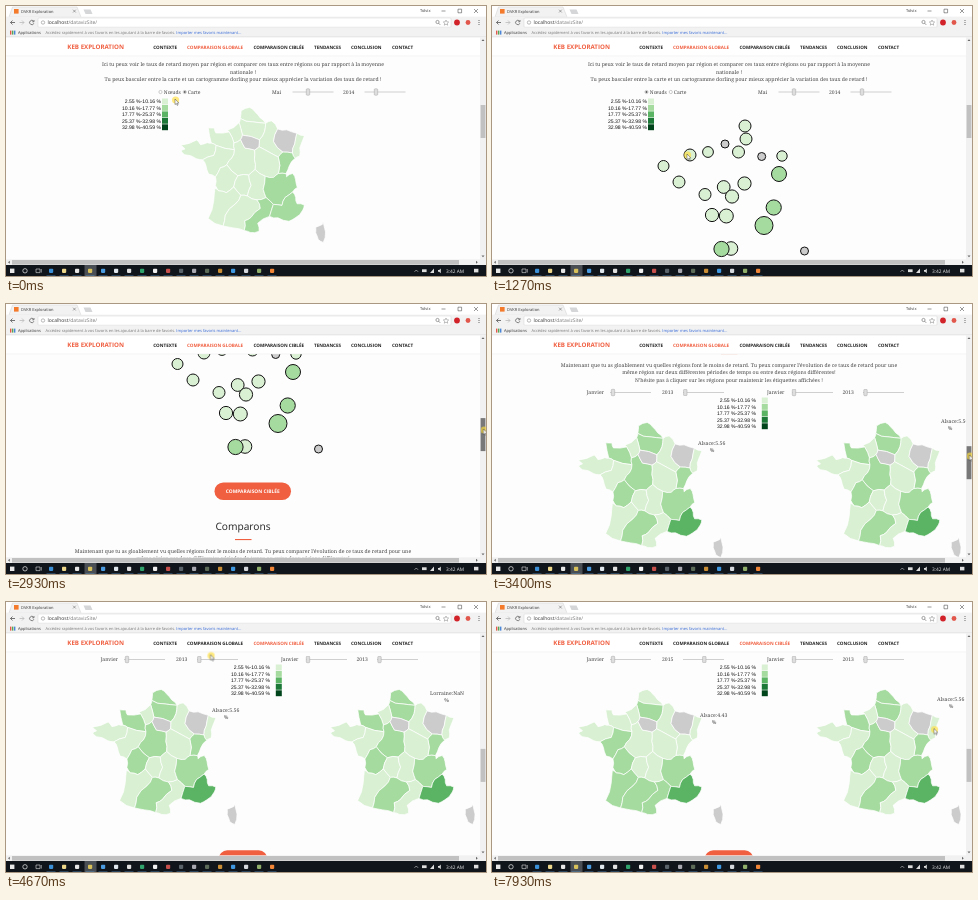
An HTML page that plays this animation: 480 by 270 pixels, repeating every 8000 ms.

```html
<!DOCTYPE html>
<html lang="fr">
<head>
<meta charset="utf-8">
<title>Exploration</title>
<style>
html, body { margin: 0; width: 100%; height: 100%; overflow: hidden; background: #fff; }
svg { display: block; width: 100vw; height: 100vh; text-rendering: geometricPrecision; }
text { font-family: "Noto Serif", serif; font-size: 5.04px; fill: #444; white-space: pre; }
.mid { text-anchor: middle; font-size: 5.15px; }
.end { text-anchor: end; }
.ui { font-family: "Open Sans", sans-serif; font-size: 4px; fill: #333; }
.nav { font-family: "Open Sans", sans-serif; font-size: 4.58px; font-weight: 700; fill: #222; }
.on { fill: #f05f40; }
.brand { font-size: 6.2px; }
.key { font-family: "Liberation Sans", Arial, sans-serif; font-size: 5.1px; fill: #111; }
.tip { font-size: 5.2px; }
.btn { font-size: 4.9px; fill: #fff; }
.head { font-family: "Open Sans", sans-serif; font-size: 10.2px; fill: #222; }
.region { stroke: #fff; stroke-width: .7; stroke-linejoin: round; }
.node { stroke: #111; stroke-width: 1; }

#page, #thumb, #cursor, #map0, .node, .knob { animation: 8s linear infinite; }
#page { animation-name: scroll; }
#thumb { animation-name: thumb; }
#cursor { animation-name: cursor; animation-timing-function: ease-in-out; }
#map0 { animation-name: leave; }
.node { animation-name: settle; animation-timing-function: ease-out; }
.knob { animation-name: knob; }

@keyframes scroll {
  0%, 28.75% { transform: translateY(0); }
  32.5% { transform: translateY(-25px); }
  36.6%, 37.4% { transform: translateY(-100px); }
  42.4%, 43.4% { transform: translateY(-286px); }
  46.5%, 100% { transform: translateY(-317px); }
}
@keyframes thumb {
  0%, 28.75% { transform: translateY(0); fill: #c1c1c1; }
  28.8% { fill: #787878; }
  32.5% { transform: translateY(3.8px); }
  36.6%, 37.4% { transform: translateY(15.1px); }
  42.4%, 43.4% { transform: translateY(43.2px); }
  46.5% { transform: translateY(47.9px); }
  49% { fill: #787878; }
  49.1%, 100% { transform: translateY(47.9px); fill: #c1c1c1; }
}
@keyframes cursor {
  0%, .9% { transform: translate(169px, 93px); }
  3.7%, 6.2% { transform: translate(155px, 86px); }
  11%, 22.5% { transform: translate(195px, 148px); }
  28%, 28.75% { transform: translate(477.5px, 111px); }
  36.6%, 37.4% { transform: translate(477.5px, 125px); }
  42.4%, 43.4% { transform: translate(477.5px, 151px); }
  46.5%, 49% { transform: translate(477.5px, 157px); }
  54%, 55% { transform: translate(422px, 122px); }
  58.3%, 59.2% { transform: translate(204.5px, 52.6px); }
  60.9%, 68.3% { transform: translate(204px, 56px); }
  70.2% { transform: translate(212px, 57px); }
  71.6%, 75.9% { transform: translate(207.5px, 70px); }
  79.4% { transform: translate(203px, 122px); }
  83.4%, 86.6% { transform: translate(205px, 143px); }
  89.1%, 90.8% { transform: translate(428px, 136px); }
  95%, 100% { transform: translate(442px, 126.5px); }
}
@keyframes leave {
  0%, 5.6% { opacity: 1; }
  8.5%, 100% { opacity: 0; }
}
@keyframes settle {
  0%, 5.6% { opacity: 0; transform: translate(var(--dx), var(--dy)); }
  7% { opacity: 1; }
  14.5%, 100% { opacity: 1; transform: none; }
}
@keyframes knob {
  0%, 68.3% { transform: translateX(0); }
  70.2%, 100% { transform: translateX(19px); }
}
</style>
</head>
<body>
<svg viewBox="0 0 480 270" preserveAspectRatio="none">
  <rect width="480" height="270" fill="#fdfdfd"/>
  <g id="page"></g>
  <g id="chrome"></g>
  <g id="cursor">
    <circle cx=".6" cy="1" r="3.6" fill="#ffdf3d" opacity=".65"/>
    <path d="M0 0v5.6l1.3-1.2.9 2 .9-.4-.9-1.9h1.7z" fill="#fff" stroke="#222" stroke-width=".4"/>
  </g>
</svg>
<script>
const LOOP = 8000;
const SHADES = ['#d9f0d3', '#a6dba0', '#5bb463', '#1b7837', '#00441b'];
const GREY = '#ccc';
const END = 317; // final scroll offset
const $ = id => document.getElementById(id);

// Lambert conformal conic, cone constant N
const N = .5263, SCALE = 913.6, RAD = Math.PI / 180;
function cone(lon, lat) {
  const rho = SCALE / N * Math.tan((45 - lat / 2) * RAD) ** N, a = lon * N * RAD;
  return [rho * Math.sin(a), rho * Math.cos(a)];
}
const mid = cone(2.454, 46.279);
const project = ([lon, lat]) => cone(lon, lat).map((v, i) => v - mid[i]);

// outer border, anticlockwise from the northern tip
const outer = [
  [2.54, 51.09], [1.6, 50.87], [1.5, 50.35], [1.37, 50.07], [.1, 49.55], [.3, 49.43],
  [-1.1, 49.36], [-1.26, 49.69], [-1.92, 49.7], [-1.57, 48.65], [-2, 48.68], [-2.7, 48.53],
  [-3.1, 48.85], [-4.75, 48.45], [-4.3, 48.2], [-4.7, 48.04], [-4.3, 47.8], [-3.1, 47.55],
  [-2.45, 47.48], [-2.1, 47.1], [-1.8, 46.49], [-1.1, 46.3], [-1.1, 45.7], [-.75, 45.32],
  [-1.15, 45.5], [-1.25, 44.6], [-1.78, 43.36], [-.31, 42.84], [.67, 42.7], [1.73, 42.5],
  [2.3, 42.36], [3.17, 42.43], [3.05, 43], [4.23, 43.46], [5.05, 43.33], [6.1, 43.05],
  [6.7, 43.25], [7.52, 43.79], [7.7, 44.13], [7, 44.25], [6.9, 44.7], [6.63, 45.1],
  [7.12, 45.4], [7, 45.95], [6.75, 46.4], [6.1, 46.2], [6.06, 46.42], [6.45, 46.95],
  [7.1, 47.45], [7.58, 47.58], [7.65, 48.15], [8.23, 48.97], [7.45, 49.17], [6.4, 49.45],
  [5.45, 49.55], [4.85, 50.12], [4.2, 49.97], [3.65, 50.35], [3.1, 50.78]
].map(project);

// junctions inside the country
const inner = {
  a: [1.7, 49.2], b: [1.5, 48.9], c: [.8, 48.67], d: [.85, 48.2], e: [-1.07, 48.5],
  f: [3.48, 48.85], g: [3.42, 48.37], h: [2.95, 48.15], i: [5.88, 47.93], j: [5.37, 47.6],
  k: [6.85, 47.83], l: [.05, 47.15], m: [1.17, 46.38], n: [2.28, 46.42], o: [2.95, 46.8],
  p: [3.95, 46.3], q: [5.3, 46.45], r: [.75, 45.6], s: [1.45, 45], t: [2.1, 44.95],
  u: [3.05, 44.65], v: [3.95, 44.8], w: [4.65, 44.3], x: [3.35, 44.05], y: [2.4, 43.42],
  z: [1.8, 43.2], A: [.9, 44.4], B: [-.1, 43.6], C: [5.5, 44.2], D: [5.85, 44.75],
  E: [-1.3, 47.8], F: [.6, 47.65], G: [4.95, 48.7], H: [7.15, 48.45], I: [4.8, 46.2],
  J: [3.7, 45.4], K: [4.05, 49.4], L: [1.95, 48.3], M: [-.6, 46.95], N: [2.9, 47.5],
  O: [4.5, 47.95], P: [2.8, 50.1], R: [0, 45.2], S: [2.5, 45.7]
};
for (const k in inner) inner[k] = project(inner[k]);

const island = [[9.4, 43], [9.45, 42.6], [9.55, 42.1], [9.25, 41.37], [8.8, 41.6],
  [8.6, 42.1], [8.65, 42.5], [9.3, 42.65]].map(project);

// name: [ring, circle x, y, radius]
const regions = {
  nord: ['0-2 P 56-58', 253, 120, 6],
  picardie: ['2-3 a f K 56 P', 254, 133, 6],
  hauteNormandie: ['3-5 c b a', 216, 146, 5.4],
  basseNormandie: ['5-9 e d c', 198, 149, 6],
  bretagne: ['9-18 E e', 171.5, 160, 5.5],
  loire: ['18-21 M l F d e E', 187, 176, 6],
  centre: ['c d F l m n o N h L b', 213, 188.5, 6],
  ile: ['a b L h g f', 233, 138, 4],
  champagne: ['56 K f g O j i G 54-55', 246.5, 146, 6],
  lorraine: ['54 G i k H 52-53', 269.7, 150.5, 4],
  alsace: ['52 H k 48-51', 290, 150, 5.2],
  comte: ['i j q 46-48 k', 287, 168, 7.5],
  bourgogne: ['h N o p I q j O g', 252.5, 177.5, 6.6],
  poitou: ['21-23 R r m l M', 220, 209, 6.6],
  limousin: ['m r s t S n', 231.7, 181, 6.4],
  auvergne: ['n S t u v J p o', 240, 190.5, 6.6],
  rhone: ['p J v w C D 41-46 q I', 281.7, 201.5, 7.6],
  aquitaine: ['23-27 B A s r R', 234.3, 210, 7],
  midi: ['27-29 z y x u t s A B', 239, 242.5, 6.8],
  languedoc: ['29-33 w v u x y z', 229.5, 243, 7.6],
  paca: ['33-41 D C w', 272, 219.5, 9],
  corse: [null, 312.5, 245, 4]
};

function ring(spec) {
  if (!spec) return island;
  return spec.split(' ').flatMap(s => {
    if (inner[s]) return [inner[s]];
    const [a, b = a] = s.split('-').map(Number);
    return outer.slice(a, b + 1);
  });
}

// bend every edge a little, equally for both neighbours
function bend(p, q) {
  const [a, b] = p[0] < q[0] ? [p, q] : [q, p];
  const k = .09 * Math.sin(a[0] * 7 + b[1] * 5);
  return [(a[0] + b[0]) / 2 + k * (b[1] - a[1]), (a[1] + b[1]) / 2 - k * (b[0] - a[0])];
}
const fix = p => p.map(v => v.toFixed(2)).join(' ');
const outline = pts => 'M' + pts.map((p, i) => {
  const q = pts[(i + 1) % pts.length];
  return fix(p) + 'L' + fix(bend(p, q));
}).join('L') + 'Z';

function shade(name, medium, strong) {
  if (['ile', 'lorraine', 'corse'].includes(name)) return GREY;
  return SHADES[name === strong ? 2 : medium.split(' ').includes(name) ? 1 : 0];
}
function map(x, y, medium, strong, attrs = '') {
  const paths = Object.entries(regions).map(([name, [spec]]) =>
    `<path class="region" fill="${shade(name, medium, strong)}" d="${outline(ring(spec))}"/>`);
  return `<g ${attrs}><g transform="translate(${x} ${y})">${paths.join('')}</g></g>`;
}
function nodes(x, y, medium) {
  return Object.entries(regions).map(([name, [spec, cx, cy, r]]) => {
    const pts = ring(spec);
    const avg = i => pts.reduce((s, p) => s + p[i], 0) / pts.length;
    const dx = (x + avg(0) - cx).toFixed(1), dy = (y + avg(1) - cy).toFixed(1);
    return `<circle class="node" style="--dx:${dx}px;--dy:${dy}px" cx="${cx}" cy="${cy}" r="${r}" fill="${shade(name, medium)}"/>`;
  }).join('');
}

const text = (x, y, s, cls = '', attrs = '') => `<text x="${x}" y="${y}" class="${cls}" ${attrs}>${s}</text>`;
const rect = (x, y, w, h, fill, attrs = '') => `<rect x="${x}" y="${y}" width="${w}" height="${h}" fill="${fill}" ${attrs}/>`;
const dot = (x, y, r, fill, attrs = '') => `<circle cx="${x}" cy="${y}" r="${r}" fill="${fill}" ${attrs}/>`;
const line = (d, color, w = .6) => `<path d="${d}" fill="none" stroke="${color}" stroke-width="${w}"/>`;
const span = (a, b) => `data-span="${a} ${b}"`;

const slider = (x, y, at, cls = '') =>
  rect(x, y - .5, 41, 1, '#cfcfcf') +
  rect(at - 1.7, y - 3.2, 3.4, 6.4, '#dedede', `class="${cls}" rx=".8" stroke="#a4a4a4" stroke-width=".5"`);

function legend(right, box, y) {
  const stops = ['2.55', '10.16', '17.77', '25.37', '32.98', '40.59'];
  return SHADES.map((c, i) =>
    text(right, y + i * 6.45 + 1.8, `${stops[i]} %-${stops[i + 1]} %`, 'key end') +
    rect(box, y + i * 6.45 - 3, 6, 5.9, c)).join('');
}
const radio = (x, y, a, b) => dot(x, y, 1.6, '#fff', 'stroke="#999" stroke-width=".5"') +
  dot(x, y, .9, '#555', span(a, b));
const button = (x, y, w, label = '') => rect(x, y, w, 17.6, '#f05f40', 'rx="8.8"') +
  text(x + w / 2, y + 10.6, label, 'nav btn mid');
const tip = (x, y, s, half, a, b) => `<g ${span(a, b)}>` + text(x, y + 1.8, s, 'tip') +
  text(x + half, y + 9.2, '%', 'tip mid') + '</g>';

const JAN13 = 'nord picardie basseNormandie centre poitou midi comte rhone';
const JAN15 = 'picardie loire poitou aquitaine midi languedoc rhone';
const MAY14 = 'comte rhone languedoc paca';
const row = END + 57.5;

$('page').innerHTML = [
  text(237, 60.2, 'Ici tu peux voir le taux de retard moyen par région et comparer ces taux entre régions ou par rapport à la moyenne', 'mid'),
  text(237, 67.8, 'nationale !', 'mid'),
  text(237, 74.9, 'Tu peux basculer entre la carte et un cartogramme dorling pour mieux apprécier la variation des taux de retard !', 'mid'),
  radio(154.5, 86, 480, LOOP), text(157.8, 87.8, 'Nœuds'),
  radio(178.8, 86, 0, 480), text(181.8, 87.8, 'Carte'),
  text(266, 87.8, 'Mai'), slider(286.5, 86, 302),
  text(337, 87.8, '2014'), slider(358.5, 86, 370),
  legend(155, 156, 95.5),
  map(244.5, 171, MAY14, '', 'id="map0"'),
  nodes(244.5, 171, MAY14),
  button(208.5, 278.5, 76.5, 'COMPARAISON CIBLÉE'),
  text(237, 326.3, 'Comparons', 'head mid'),
  rect(229, 335, 16.5, 1.1, '#f05f40'),
  text(237, 349.2, 'Maintenant que tu as gloablement vu quelles régions font le moins de retard. Tu peux comparer l’évolution de ce taux de retard pour une', 'mid'),
  text(237, 356.3, 'même région sur deux différentes périodes de temps ou entre deux régions différentes!', 'mid'),
  text(237, 363.6, 'N’hésite pas à cliquer sur les régions pour maintenir les étiquettes affichées !', 'mid'),
  text(94.5, row + 1.8, 'Janvier'), slider(118, row, 121),
  text(170, row + 1.8, '2013', '', span(0, 5600)),
  text(170, row + 1.8, '2015', '', span(5600, LOOP)),
  slider(191, row, 193.3, 'knob'),
  text(275, row + 1.8, 'Janvier'), slider(300, row, 302),
  text(350.5, row + 1.8, '2013'), slider(371, row, 373.5),
  legend(264, 269.8, END + 65.5),
  map(156, END + 157, JAN13, 'paca', span(0, 5600)),
  map(156, END + 157, JAN15, 'paca', span(5600, LOOP)),
  map(394, END + 157, JAN13, 'paca'),
  tip(206, END + 108, 'Alsace:5.56', 14, 0, 6330),
  tip(208, END + 113, 'Alsace:4.43', 14, 6330, LOOP),
  tip(449, END + 86, 'Alsace:5.56', 9, 0, 4200),
  tip(424, END + 91, 'Lorraine:NaN', 16.5, 4200, 7400),
  tip(445, END + 97, 'Alsace:5.56', 14, 7400, LOOP),
  button(212.5, 565.3, 49)
].join('');

// label, then the time it is highlighted
const menu = [[147.3, 'CONTEXTE'], [181, 'COMPARAISON GLOBALE', 0, 3530], [247.5, 'COMPARAISON CIBLÉE', 3530, LOOP],
  [308, 'TENDANCES'], [345, 'CONCLUSION'], [386, 'CONTACT']];
const item = ([x, s, a, b]) => b
  ? text(x, 42.7, s, 'nav on', span(a, b)) + text(x, 42.7, s, 'nav', a ? span(0, a) : span(b, LOOP))
  : text(x, 42.7, s, 'nav');
const apps = ['#3b8fd6', '#ecd68a', '#e6e6e6', '#d8c05a', '#4a9be0', '#dfe6ec', '#e0e0e0', '#2fa36b', '#f0f0f0',
  '#c8504c', '#5a626a', '#a8a8b0', '#5c6a58', '#c98d35', '#3f98e0', '#d4d8dc', '#8fae6a', '#f08537'];

$('chrome').innerHTML = [
  // tab strip
  rect(0, 0, 480, 11, '#fff'),
  '<path d="M3 11L6.5 1H71l4 10z" fill="#f2f2f2" stroke="#c4c4c4" stroke-width=".4"/>',
  rect(8, 3, 4.6, 4.6, '#f47a2c'),
  text(15, 6.8, 'DVKR Exploration', 'ui'),
  line('M67 3.7l2.8 2.8m0-2.8l-2.8 2.8', '#555', .5),
  '<path d="M77.5 3.5h7l2 4.5h-7z" fill="#d4d6d8"/>',
  text(414, 6.3, 'Tolvix', 'ui'),
  line('M435.5 5h4M452 3.2h3.6v3.6H452zM468 3l4 4m0-4l-4 4', '#333', .5),
  // address and bookmark bars
  rect(0, 10.6, 480, 20.4, '#f2f2f2'),
  rect(32, 12, 413, 9.2, '#fff', 'rx="1" stroke="#ccc" stroke-width=".4"'),
  line('M9 16.5H4.5m2-2l-2 2 2 2', '#555', .8),
  line('M13.5 16.5H18m-2-2l2 2-2 2', '#bbb', .8),
  line('M27.6 15.2a2.2 2.2 0 1 0 .3 2M28 14v1.8h-1.8', '#555', .7),
  dot(37, 16.5, 1.7, 'none', 'stroke="#777" stroke-width=".5"'),
  text(41.5, 18.3, 'localhost<tspan fill="#777">/datavizSite/</tspan>', 'ui', 'style="font-size:5px"'),
  dot(431.5, 16, 1.6, 'none', 'stroke="#666" stroke-width=".6"'),
  line('M432.6 17.2l1.6 1.6', '#666', .7),
  '<path d="M440 14l.8 1.8 1.9.2-1.4 1.3.4 1.9-1.7-1-1.7 1 .4-1.9-1.4-1.3 1.9-.2z" fill="none" stroke="#666" stroke-width=".4"/>',
  dot(451, 16.5, 2.9, '#d2232a'),
  dot(462, 16.5, 2.4, '#e2574c'),
  [14.5, 16.5, 18.5].map(y => dot(473, y, .55, '#555')).join(''),
  [4, 6, 8].map((x, i) => rect(x, 24.6, 1.4, 4, ['#e25a4a', '#56a65a', '#4a85d8'][i])).join(''),
  text(12, 28.2, 'Applications', 'ui'),
  text(39.5, 28.2, 'Accédez rapidement à vos favoris en les ajoutant à la barre de favoris. <tspan fill="#3367d6">Importer mes favoris maintenant…</tspan>', 'ui', 'style="fill:#777"'),
  // site menu
  rect(0, 31, 474, 19, '#fff'),
  rect(0, 30.7, 480, .5, '#d0d0d0'),
  rect(0, 49.7, 474, .5, '#ececec'),
  text(61.3, 43.1, 'KEB EXPLORATION', 'nav on brand'),
  menu.map(item).join(''),
  // scrollbars
  rect(474, 31, 6, 223, '#f1f1f1'),
  rect(474.6, 99, 4.8, 33, '#c1c1c1', 'id="thumb"'),
  '<path d="M475.5 35l1.5-1.8 1.5 1.8zM475.5 249.5l1.5 1.8 1.5-1.8z" fill="#666"/>',
  rect(0, 253.3, 480, 6, '#f1f1f1'),
  rect(6, 254, 447, 4.6, '#c1c1c1'),
  '<path d="M3.8 254.8L2 256.3l1.8 1.5zM470 254.8l1.8 1.5-1.8 1.5z" fill="#666"/>',
  // taskbar
  rect(0, 259, 480, 11, '#10151b'),
  rect(78.5, 259, 12, 11, '#4a4f55'),
  rect(4, 262.6, 4.4, 4.4, '#e8e8e8'),
  dot(19, 264.8, 2.2, 'none', 'stroke="#eee" stroke-width=".7"'),
  line('M30 263h4v3.6h-4zM35.3 263v3.6', '#ddd', .6),
  apps.map((c, i) => rect(43 + i * 13, 262.7, 4.2, 4.2, c, 'rx=".8"') +
    rect(40.5 + i * 13, 269.4, 9, .6, '#5b9bd5', 'opacity=".6"')).join(''),
  line('M408.5 265.8l1.8-1.8 1.8 1.8', '#ddd', .6),
  rect(416, 263.3, 4.6, 2.8, '#ddd'),
  '<path d="M424 267h4v-4.4zM432 264h1.2l1.6-1.5v4.8l-1.6-1.5H432z" fill="#ddd"/>',
  text(440, 266.7, '3:42 AM', 'ui', 'style="fill:#eee;font-size:4.8px"'),
  rect(468, 262.8, 4.4, 3.6, '#ddd')
].join('');

// on/off animations for parts that only exist for a while
const sheet = document.createElement('style');
document.querySelectorAll('[data-span]').forEach((el, i) => {
  const [a, b] = el.dataset.span.split(' ').map(t => t / LOOP * 100);
  const tail = b < 100 ? `${b}%,100%{opacity:0}` : '100%{opacity:1}';
  sheet.textContent += `@keyframes span${i}{${a ? '0%{opacity:0}' : ''}${a}%{opacity:1}${tail}}`;
  el.style.animation = `span${i} 8s step-end infinite`;
});
document.head.append(sheet);
</script>
</body>
</html>
```
